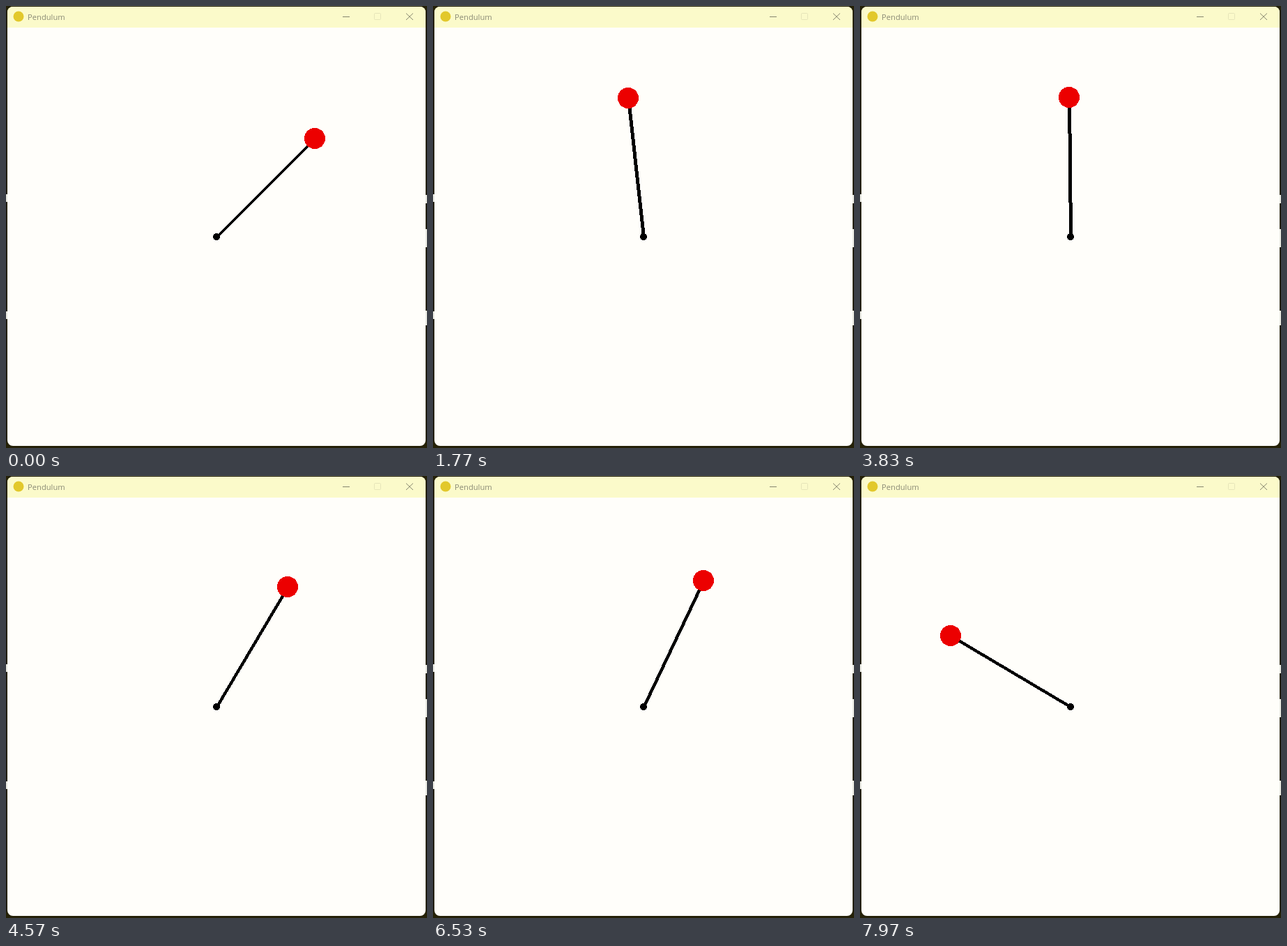
Write an HTML page that moves like this. It is 604 px wide and 634 px high and loops after 8 s.

```html
<!DOCTYPE html>
<html lang="en">
<head>
<meta charset="utf-8">
<title>Pendulum</title>
<style>
  html, body { margin: 0; width: 100%; height: 100%; overflow: hidden; background: #252108; }
  svg { display: block; width: 100vw; height: 100vh; }
  text { font: 11.2px "Open Sans", "Noto Sans", sans-serif; fill: #8b8b76; }
</style>
</head>
<body>
<svg viewBox="0 0 604 634">
  <defs>
    <clipPath id="win"><rect x="2" y="1" width="600" height="630" rx="8"/></clipPath>
  </defs>
  <rect width="604" height="634" fill="#252108"/>
  <path fill="#e6e6df" d="M0 270h2v11h-2zM0 438h2v11h-2zM602 271h2v12h-2zM602 320h2v26h-2zM602 437h2v21h-2z"/>
  <g clip-path="url(#win)">
    <rect x="2" y="1" width="600" height="630" fill="#fffefa"/>
    <rect x="2" y="1" width="600" height="30" fill="#fbfaca"/>
  </g>
  <circle cx="18" cy="15" r="7.5" fill="#e2c82c"/>
  <text x="31" y="20">Pendulum</text>
  <g fill="none" stroke="#85856e">
    <path d="M483 15.5h10M574 10.5l10 9.5M584 10.5l-10 9.5"/>
    <rect x="528.5" y="10.5" width="9" height="9" rx="1" stroke="#e6e5b9"/>
  </g>
  <g shape-rendering="crispEdges">
    <polygon id="rod"/>
    <circle id="bob" r="15" fill="#ec0000"/>
    <circle cx="302" cy="331" r="5"/>
  </g>
</svg>
<script>
const LOOP = 8000, FRAME = 100 / 3;
const PX = 302, PY = 331, LEN = 200, ROD = 5;

// [seconds, degrees from upright, clockwise]
const keys = [
  [0, 45], [0.04, 46.5], [0.52, -48], [0.9, 44.4], [0.98, 55.6],
  [1.5, -50], [2.05, 39.8], [2.63, -50.8], [2.7, -54], [3.33, 44],
  [3.52, 94], [3.83, -0.6], [4.08, -40], [4.55, 31], [5, -80],
  [5.1, -99], [5.33, -2], [5.52, 46], [5.95, -50], [6.53, 25.4],
  [6.67, 50.8], [7.03, 164], [7.5, 35.8], [7.93, -61], [7.97, -59.3], [8, -57]
];

const slope = i => (keys[i + 1][1] - keys[i][1]) / (keys[i + 1][0] - keys[i][0]);

// Monotone tangents: flat at every turning point.
const tangents = keys.map((_, i) => {
  if (i === 0 || i === keys.length - 1) return 0;
  const a = slope(i - 1), b = slope(i);
  return a * b > 0 ? 2 * a * b / (a + b) : 0;
});

function angleAt(t) {
  let i = 0;
  while (i < keys.length - 2 && t >= keys[i + 1][0]) i++;
  const [t0, a] = keys[i], [t1, b] = keys[i + 1];
  const h = t1 - t0, u = (t - t0) / h, v = 1 - u;
  return v * v * (1 + 2 * u) * a + u * u * (3 - 2 * u) * b
    + h * u * v * (v * tangents[i] - u * tangents[i + 1]);
}

const rod = document.getElementById("rod");
const bob = document.getElementById("bob");

function draw(ms) {
  const step = Math.floor((ms + 5) / FRAME) % 240;
  const t = Math.round(step * FRAME / 10) / 100;
  const a = angleAt(t) * Math.PI / 180;
  const x = Math.round(PX + LEN * Math.sin(a));
  const y = Math.round(PY - LEN * Math.cos(a));

  // The rod's ends are cut along the minor axis.
  const steep = Math.abs(y - PY) > Math.abs(x - PX);
  const ox = steep ? ROD / 2 : 0, oy = steep ? 0 : ROD / 2;
  const corner = (cx, cy, s) => `${cx + 0.5 + s * ox},${cy + 0.5 + s * oy}`;
  rod.setAttribute("points", [
    corner(PX, PY, -1), corner(PX, PY, 1), corner(x, y, 1), corner(x, y, -1)
  ].join(" "));
  bob.setAttribute("cx", x);
  bob.setAttribute("cy", y);
}

const start = performance.now();
function tick() {
  draw((performance.now() - start) % LOOP);
  requestAnimationFrame(tick);
}
tick();
</script>
</body>
</html>
```
